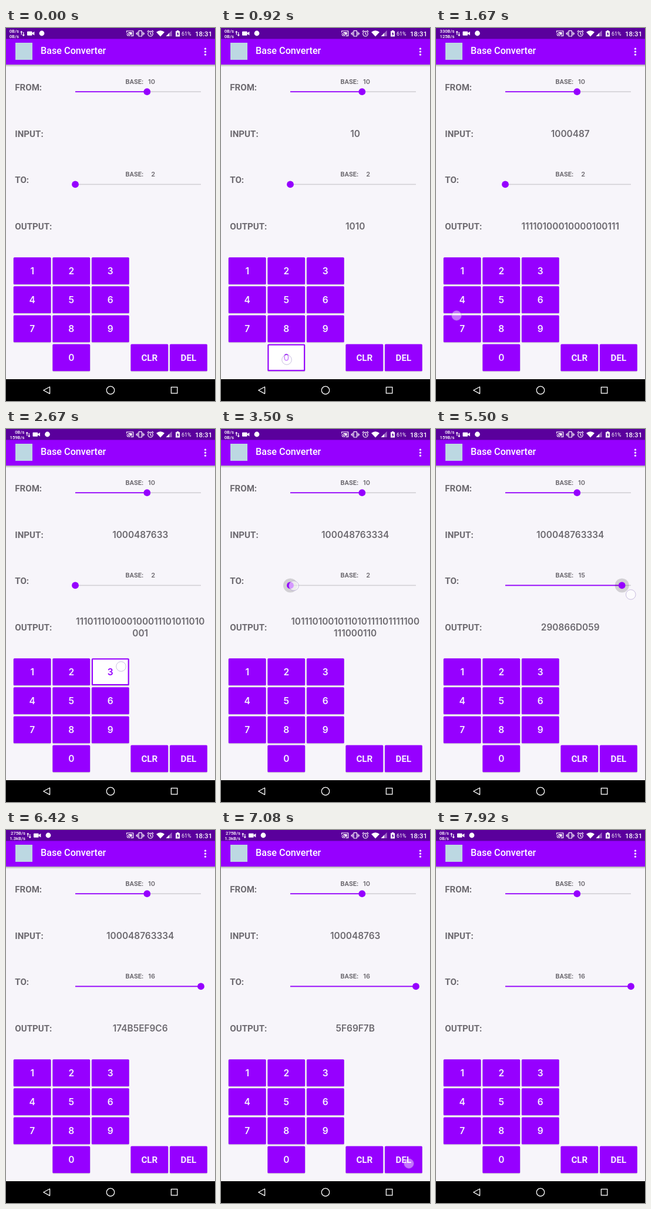
Write an HTML page that moves like this. It is 356 px wide and 633 px high and loops after 8 s.

```html
<!DOCTYPE html>
<html lang="en">
<head>
<meta charset="utf-8">
<title>Base Converter</title>
<style>
  html, body { margin: 0; width: 100%; height: 100%; overflow: hidden; background: #f7f5fa; }
  svg { display: block; width: 100vw; height: 100vh; }
  text { font-family: Roboto, "Open Sans", sans-serif; font-weight: 500; }
  .label { font-size: 15.1px; fill: #6d6a70; }
  .label text, .base { font-weight: 600; }
  .num { font-family: Inter, Roboto, sans-serif; font-weight: 600; font-size: 15.4px; fill: #6d6a70; text-anchor: middle; }
  .base { font-size: 11px; fill: #6d6a70; }
  .baseNum { font-family: Inter, Roboto, sans-serif; text-anchor: end; }
  .net { font-size: 7.7px; fill: #fff; text-anchor: end; }
  .key .face { fill: #9600ff; }
  .key .shade { fill: #000; opacity: .15; }
  .key .hole { fill: #fff; visibility: hidden; }
  .key text { font-size: 15.2px; font-weight: 600; fill: #f8f0ff; text-anchor: middle; }
  .key text.digit { font-family: Inter, Roboto, sans-serif; font-size: 15.5px; }
  .key.on .hole { visibility: visible; }
  .key.on text { fill: #9600ff; }
  .line { fill: none; stroke: #fff; stroke-width: 1.2; }
</style>
</head>
<body>
<svg id="stage" viewBox="0 0 356 633">
  <defs>
    <linearGradient id="drop" x2="0" y2="1">
      <stop offset="0" stop-color="#000" stop-opacity=".3"/>
      <stop offset="1" stop-color="#000" stop-opacity="0"/>
    </linearGradient>
  </defs>
  <rect width="356" height="633" fill="#f7f5fa"/>
  <rect y="62" width="356" height="4" fill="url(#drop)"/>
  <rect y="18" width="356" height="44" fill="#9600ff"/>
  <rect width="356" height="18.5" fill="#5a009c"/>

  <!-- status bar, left -->
  <text id="up" class="net" y="8"></text>
  <text id="down" class="net" y="17"></text>
  <g id="tray" fill="#fff">
    <path d="M4.3 11.5V6M2.8 7.4 4.3 5.6 5.8 7.4M7.8 7v5.8M6.3 11.4 7.8 13.2 9.3 11.4" class="line"/>
    <rect x="14" y="5.7" width="8.6" height="7" rx="1"/>
    <path d="M22.4 8.6 26.4 6V12.4L22.4 9.8Z"/>
    <circle cx="39" cy="9" r="4.4"/>
  </g>

  <!-- status bar, right -->
  <g fill="#fff">
    <path class="line" d="M205.6 7.5V5H216.6V13.4H212.5M205.5 9a5 5 0 0 1 5 5M205.5 11.3a2.6 2.6 0 0 1 2.6 2.6"/>
    <path d="M208 7H214.6V11.6H211.6Q210.6 8.6 208 7.8Z"/>
    <rect class="line" x="226" y="4.6" width="5.4" height="9.4" rx=".6"/>
    <path class="line" d="M224 6.5v6M222.2 8v3M233.4 6.5v6M235.2 8v3"/>
    <circle class="line" cx="246" cy="9.8" r="4.2"/>
    <path class="line" d="M246 7.2V10L248 11.3M240.6 6.4 243.3 4M251.4 6.4 248.7 4"/>
    <path d="M256 7Q263 1.6 270 7L263 14.6Z"/>
    <path d="M282.6 4V14H272.6Z" opacity=".4"/>
    <path d="M278 8.6V14H272.6Z"/>
    <path d="M289 5.2h2v-1.2h3v1.2h2v9.3h-7Z"/>
    <path d="M293.2 6.4 290.6 10.4h1.7v3l2.5-4h-1.6Z" fill="#5a009c"/>
    <text x="299" y="13" font-size="9" style="font-weight:400">61%</text>
    <text x="322" y="13.6" font-size="11.5">18:31</text>
  </g>

  <!-- app bar -->
  <rect x="16" y="25" width="29" height="29" fill="#bcd8e2"/>
  <text x="59" y="44" font-size="16.2" fill="#fff">Base Converter</text>
  <g fill="#fff">
    <circle cx="339.5" cy="35.2" r="1.6"/><circle cx="339.5" cy="40.2" r="1.6"/><circle cx="339.5" cy="45.2" r="1.6"/>
  </g>

  <!-- form -->
  <g class="label">
    <text x="15.3" y="106.2">FROM:</text>
    <text x="15.3" y="185">INPUT:</text>
    <text x="15.3" y="263.4">TO:</text>
    <text x="15.3" y="342.2">OUTPUT:</text>
  </g>
  <text id="input" class="num" x="228.7" y="185.3"></text>
  <text id="out1" class="num" x="228.7"></text>
  <text id="out2" class="num" x="228.7" y="352.4"></text>
  <g id="sliders"></g>
  <g id="keys"></g>

  <!-- navigation bar -->
  <rect y="596" width="356" height="37"/>
  <g class="line" style="stroke-width:1.3">
    <path d="M74.6 609V620.6L63.8 614.8Z" stroke-linejoin="round"/>
    <circle cx="178" cy="614.8" r="6.7"/>
    <rect x="281.4" y="609.5" width="10.4" height="10.4"/>
  </g>
  <circle id="touch" r="8.3" fill="#fff" fill-opacity=".6" stroke="#a795cc" stroke-opacity=".6"/>
</svg>
<script>
const LOOP = 8000, STEP = 1000 / 12;
const LEFT = 118, RIGHT = 332, NOTCH = (RIGHT - LEFT) / 14;
const $ = id => document.getElementById(id);

function add(parent, tag, attrs, text = '') {
  const el = document.createElementNS('http://www.w3.org/2000/svg', tag);
  set(el, attrs);
  el.textContent = text;
  return parent.appendChild(el);
}
function set(el, attrs) {
  for (const k in attrs) el.setAttribute(k, attrs[k]);
}
function write(el, text) {
  if (el.textContent !== text) el.textContent = text;
}

function slider(y) {
  const g = $('sliders');
  add(g, 'text', { class: 'base', x: 203.6, y: y - 13.2 }, 'BASE:');
  const num = add(g, 'text', { class: 'base baseNum', x: 254, y: y - 13.2 });
  add(g, 'rect', { x: LEFT, y: y - .8, width: RIGHT - LEFT, height: 1.6, fill: '#d2d0d5' });
  const fill = add(g, 'rect', { x: LEFT, y: y - .9, height: 1.8, fill: '#9600ff' });
  const halo = add(g, 'circle', { cy: y, r: 12, fill: '#000', opacity: .15 });
  const thumb = add(g, 'circle', { cy: y, r: 5.9, fill: '#9600ff' });
  return (base, held) => {
    const x = LEFT + (base - 2) * NOTCH;
    write(num, String(base));
    set(fill, { width: x - LEFT });
    set(halo, { cx: x, visibility: held ? 'visible' : 'hidden' });
    set(thumb, { cx: x });
  };
}
const setFrom = slider(108.2), setTo = slider(265.4);
setFrom(10, false);

const keys = {};
['123', '456', '789', ' 0'].forEach((row, j) =>
  [...row].forEach((name, i) => name !== ' ' && addKey(name, i, j)));
addKey('CLR', 3, 3);
addKey('DEL', 4, 3);

function addKey(name, col, row) {
  const x = 12.8 + col * 66.55, y = 389.2 + row * 49.1;
  const g = keys[name] = add($('keys'), 'g', { class: 'key' });
  add(g, 'rect', { class: 'shade', x: x - .3, y: y + .6, width: 64.4, height: 46.4, rx: 2 });
  add(g, 'rect', { class: 'face', x, y, width: 63.8, height: 45.8, rx: 1.5 });
  add(g, 'rect', { class: 'hole', x: x + 2.1, y: y + 2.1, width: 59.6, height: 41.6 });
  add(g, 'text', { class: name.length > 1 ? '' : 'digit', x: x + 31.9, y: y + 28.3 }, name);
}

// key, step pressed, step released, touch x, touch y
const taps = [
  ['1', 6, 8, 36, 416], ['0', 9, 10, 112, 562], ['0', 11, 12, 112, 563], ['0', 13, 14, 111, 563],
  ['4', 15, 16, 38, 466], ['8', 17, 18, 106, 514], ['7', 19, 20, 35, 488], ['6', 23, 25, 186, 464],
  ['3', 27, 28, 195, 405], ['3', 29, 30, 196, 404], ['3', 31, 33, 196, 403], ['4', 36, 38, 44, 462],
  ['DEL', 81, 82, 319, 566], ['DEL', 82, 83, 319, 566], ['DEL', 84, 85, 320, 566],
  ['DEL', 87, 88, 320, 566], ['DEL', 90, 91, 319, 567], ['CLR', 92, 94, 247, 568]
];
// step, touch x, touch y
const drag = [
  [42, 124, 266], [45, 155, 268], [52, 238, 273], [55, 290, 276], [60, 314, 279],
  [65, 327, 281], [66, 331.8, 281], [69, 347, 278], [76, 347, 268]
];
// step, upload, download, right edge
const net = [
  [0, '0B/s', '0B/s', 22], [14, '330B/s', '125B/s', 31.5], [26, '0B/s', '159B/s', 31.5],
  [38, '0B/s', '0B/s', 22], [63, '0B/s', '159B/s', 31.5], [76, '275B/s', '1.3kB/s', 33],
  [88, '0B/s', '0B/s', 22]
];

function dragAt(n) {
  const i = drag.findIndex(p => p[0] >= n);
  if (i < 0) return drag[drag.length - 1].slice(1);
  if (i === 0) return drag[0].slice(1);
  const [n0, x0, y0] = drag[i - 1], [n1, x1, y1] = drag[i];
  const k = (n - n0) / (n1 - n0);
  return [x0 + (x1 - x0) * k, y0 + (y1 - y0) * k];
}

function type(text, key) {
  if (key === 'CLR') return '';
  return key === 'DEL' ? text.slice(0, -1) : text + key;
}

// Splits digits where the output column is full.
function wrap(text) {
  let width = 0, i = 0;
  for (; i < text.length; i++) {
    width += text[i] === '1' ? 6.8 : 9.9;
    if (width > 226) break;
  }
  return [text.slice(0, i), text.slice(i)];
}

function draw(n) {
  const down = {};
  let input = '', touch = null;
  for (const [key, press, release, x, y] of taps) {
    if (n >= release) input = type(input, key);
    if (n >= press && n < release) down[key] = true;
    if (n >= press && n <= release) touch = [x, y, n < release ? 1 : .75];
  }
  for (const k in keys) keys[k].classList.toggle('on', !!down[k]);

  const held = n >= 42 && n <= 76;
  const pos = dragAt(n);
  const base = Math.max(2, Math.min(16, 2 + Math.floor((pos[0] - LEFT) / NOTCH)));
  if (held) touch = [...pos, 1];
  setTo(base, held);

  write($('input'), input);
  const [a, b] = wrap(input && Number(input).toString(base).toUpperCase());
  write($('out1'), a);
  write($('out2'), b);
  set($('out1'), { y: b ? 332.4 : 342.4 });

  set($('touch'), touch
    ? { cx: touch[0], cy: touch[1], opacity: touch[2], visibility: 'visible' }
    : { visibility: 'hidden' });

  const [, up, dn, edge] = net.filter(s => s[0] <= n).pop();
  write($('up'), up);
  write($('down'), dn);
  set($('up'), { x: edge });
  set($('down'), { x: edge });
  set($('tray'), { transform: `translate(${edge} 0)` });
}

const start = performance.now();
function tick() {
  const t = (performance.now() - start) % LOOP;
  draw(Math.min(95, Math.floor((t + 4) / STEP)));
  requestAnimationFrame(tick);
}
tick();
</script>
</body>
</html>
```
